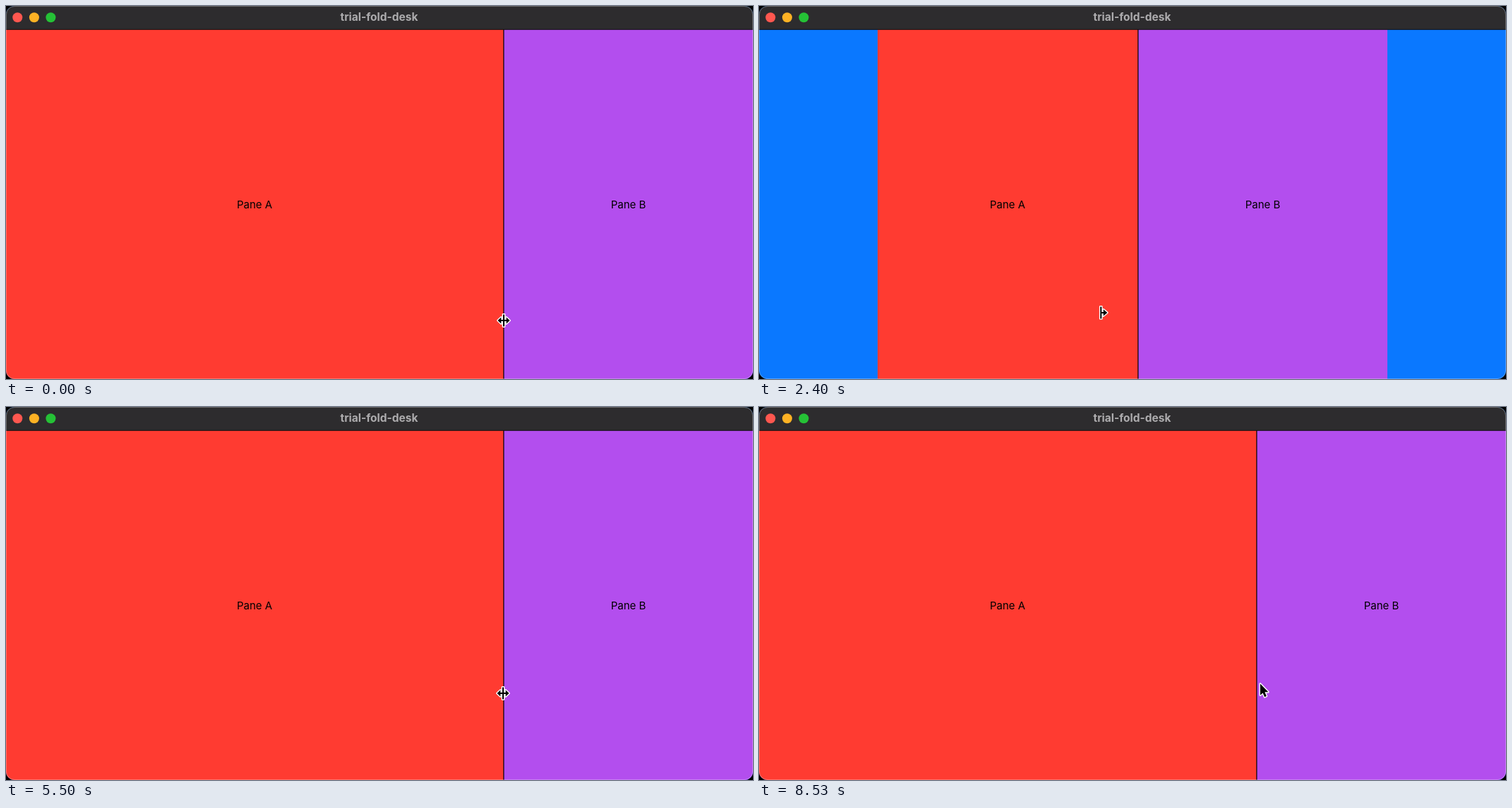
Animation of 1058 by 529 pixels, one loop 8.81 s. Source, as an HTML page:

```html
<!DOCTYPE html>
<html lang="en">
<head>
<meta charset="utf-8">
<title>Split panes</title>
<style>
  html, body { margin: 0; width: 100%; height: 100%; overflow: hidden; background: #000; }
  svg { display: block; width: 1058px; height: 529px; }
  text { font: 15px Inter, Roboto, sans-serif; text-anchor: middle; }
  .title { font-size: 15.5px; font-weight: 700; fill: #adacae; }
  #cursor { stroke: #fff; stroke-width: 2.8; stroke-linejoin: round; paint-order: stroke; }
</style>
</head>
<body>
<svg viewBox="0 0 1058 529">
  <clipPath id="window"><rect width="1058" height="529" rx="12"/></clipPath>
  <g clip-path="url(#window)">
    <rect width="1058" height="529" fill="#0a78ff"/>
    <rect id="paneA" y="33" height="496" fill="#ff3b31"/>
    <rect id="paneB" y="33" height="496" fill="#b34eee"/>
    <rect id="divider" y="33" width="1.2" height="496"/>
    <rect width="1058" height="33" fill="#2d2c2e"/>
    <rect y="32.8" width="1058" height="1" fill="#0d0c0e"/>
  </g>
  <rect x=".5" y=".5" width="1057" height="528" rx="11.5" fill="none" stroke="#fff" stroke-opacity=".28"/>
  <circle cx="16.3" cy="16.2" r="7" fill="#ff574f"/>
  <circle cx="39.9" cy="16.2" r="7" fill="#fdb224"/>
  <circle cx="63.4" cy="16.2" r="7" fill="#25c136"/>
  <text class="title" x="528.5" y="21.3">trial-fold-desk</text>
  <text id="labelA" y="287">Pane A</text>
  <text id="labelB" y="287">Pane B</text>
  <path id="cursor"/>
</svg>
<script>
const LOOP = 8810, WIDTH = 1058, REST = 704, MIN_A = 235, MIN_B = 235;
const LAG = 46; // the divider trails the pointer by this many ms
const SNAP_BACK = [4330, 7700];

const BOTH = 'M-8.5 0L-3.7-4.6V-1H-1V-8.5H1V-1H3.7V-4.6L8.5 0L3.7 4.6V1H1V8.5H-1V1H-3.7V4.6Z';
const RIGHT = 'M-4.5-8.5H-2.5V-1H0V-4.6L5.5 0L0 4.6V1H-2.5V8.5H-4.5Z';
const ARROW = 'M.9 1.5V17.8L4.6 14.4L7.1 20.2L9.8 19L7.3 13.3H12.3Z';

// Pointer moves; it rests between them.
const moves = [
  { start: 1500, end: 1570, x: 679, y: 444 },
  { start: 1570, end: 2130, x: 629, y: 440 },
  { start: 2270, end: 2400, x: 488, y: 435 },
  { start: 2400, end: 4000, x: 165, y: 326 },
  { start: 4800, end: 5450, x: 704, y: 406 },
  { start: 5700, end: 6570, x: 1003, y: 406 },
  { start: 6600, end: 6800, x: 826, y: 379 },
  { start: 7027, end: 7100, x: 744, y: 379 },
  { start: 7100, end: 7400, x: 650, y: 382 },
  { start: 8000, end: 8530, x: 709, y: 391 }
];

const clamp = (value, low, high) => Math.min(high, Math.max(low, value));

function set(id, attrs) {
  const node = document.getElementById(id);
  for (const name in attrs) node.setAttribute(name, attrs[name]);
}

function pointerAt(time) {
  let x = 705, y = 446;
  for (const move of moves) {
    const progress = clamp((time - move.start) / (move.end - move.start), 0, 1);
    x += (move.x - x) * progress;
    y += (move.y - y) * progress;
  }
  return { x, y };
}

const isDragging = time =>
  time >= 1500 && time < SNAP_BACK[0] || time >= 5700 && time < SNAP_BACK[1];

function splitAt(time) {
  if (!isDragging(time)) return REST;
  const x = Math.round(pointerAt(time - LAG).x - 0.5);
  return clamp(x, (REST + MIN_A) / 2 - 0.5, WIDTH - MIN_B);
}

function cursorAt(time) {
  if (time >= 1500 && time < 4300) return RIGHT;
  const away = time >= 4300 && time < 5400 || time >= SNAP_BACK[1];
  return away ? ARROW : BOTH;
}

function draw() {
  const time = performance.now() % LOOP;
  const split = splitAt(time), pointer = pointerAt(time);
  // Below its ideal width the pair of panes shrinks towards the centre.
  const left = Math.max(0, REST - split), right = WIDTH - left;

  set('paneA', { x: left, width: split + 1 - left });
  set('paneB', { x: split + 1, width: right - split - 1 });
  set('divider', { x: split + 0.3 });
  set('labelA', { x: (left + split) / 2 });
  set('labelB', { x: (split + 1 + right) / 2 });
  set('cursor', { d: cursorAt(time), transform: `translate(${pointer.x} ${pointer.y})` });
  requestAnimationFrame(draw);
}
draw();
</script>
</body>
</html>
```
